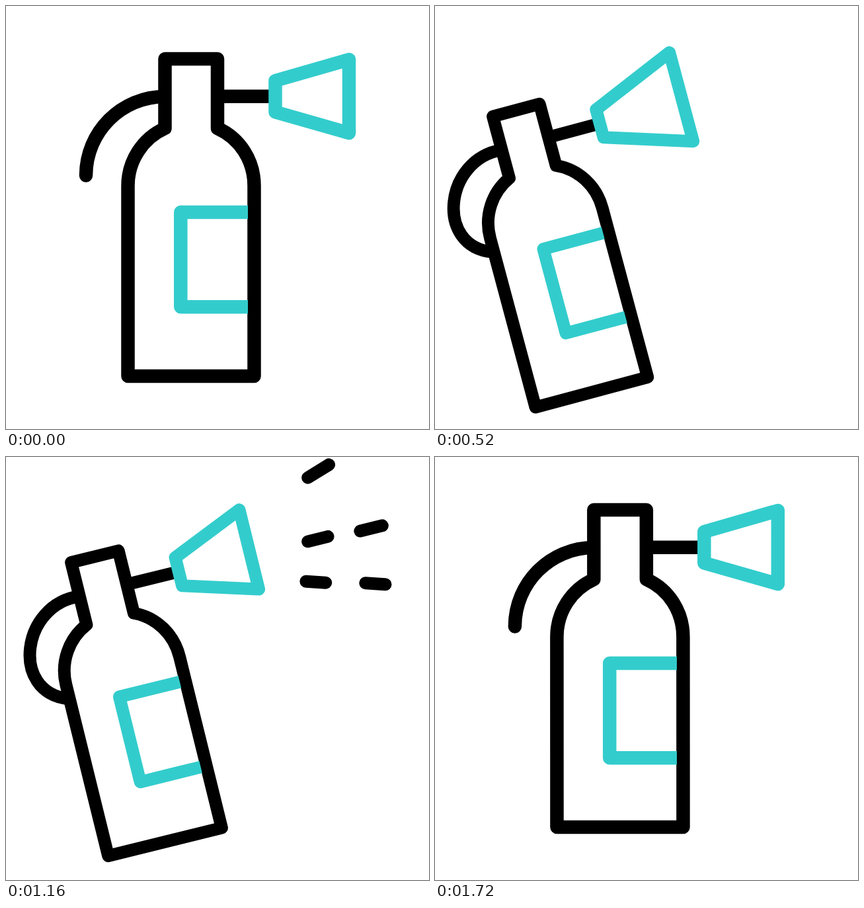
An HTML page that plays this animation: 640 px wide and 640 px high, repeating every 2 s.

```html
<!DOCTYPE html>
<html lang="en">
<head>
<meta charset="utf-8">
<title>Fire extinguisher</title>
<style>
  html, body { margin: 0; width: 100%; height: 100%; overflow: hidden; background: #fff; }
  svg { display: block; width: 100vw; height: 100vh; }
  path { fill: none; stroke: #000; stroke-width: 20.5; stroke-linecap: round; stroke-linejoin: round; }
  .teal { stroke: #33cccc; }
  .solid { fill: #fff; }
  #label { stroke-linecap: butt; }
</style>
</head>
<body>
<svg viewBox="0 0 640 640">
  <g id="rig">
    <path id="spray"/>
    <path id="handle"/>
    <path d="M320 136.7H407"/>
    <path id="horn" class="teal solid"/>
    <path class="solid" d="M240.5 185V80H320V185C354 200 375.5 234 375.5 272V560H184.5V272C184.5 234 207 200 240.5 185Z"/>
    <path id="label" class="teal" d="M366 312H264.3V455.3H366"/>
  </g>
</svg>
<script>
const LOOP = 2000, STEP = 40;
const $ = id => document.getElementById(id);

const ease = (t, from, to) => {
  const u = Math.min(1, Math.max(0, (t - from) / (to - from)));
  return u * u * (3 - 2 * u);
};
const mix = (a, b, k) => a + (b - a) * k;
const arc = (mid, end, k) => 2 * k * (1 - k) * mid + k * k * end;

// Three lanes fan out from the horn: height, path slope, acceleration, launch times
const LANES = [
  { y: 73.5, slope: -.35, acc: .0008, starts: [494, 736] },
  { y: 136, slope: .045, acc: .00055, starts: [523, 690] },
  { y: 186, slope: .277, acc: .00045, starts: [475, 677] }
];

// Later dashes leave a little faster and every dash grows on its way
function spray(t) {
  let d = '';
  LANES.forEach(({ y, slope, acc, starts }, lane) => starts.forEach((start, nth) => {
    if (t < start || t > 1700) return;
    const side = lane - 1;
    const x = 488 + acc * (1 + .12 * nth) * (t - start) ** 2;
    const w = 30.5 + (.04 - .036 * side) * (x - 544);
    d += `M${x} ${y + slope * (x - 548)}l${w} ${w * .32 * side}`;
  }));
  return d;
}

// Quarter circle when open, curled against the body when squeezed
function handle(k) {
  const at = (x0, y0, x1, y1) => `${mix(x0, x1, k)} ${mix(y0, y1, k)} `;
  return 'M240.5 137C' + at(174.5, 137, 145, 127) + at(121, 190.5, 93, 262) + at(121, 256.5, 182, 295);
}

// The mouth flares out, then settles to a smaller flare
function horn(open, settle) {
  const flare = 30 * open * (1 - .71 * settle);
  const x = 519 + flare, spread = .43 * flare;
  return `M407.5 113L${x} ${81 - 15 * open - spread}V${192.2 + spread}L407.5 160.3Z`;
}

function draw(t) {
  const go = ease(t, 120, 480), left = 1 - ease(t, 1043, 1733);
  const tilt = go * left;
  // Swing in on a wide arc, return on a nearly straight one
  const [x, y] = go < 1
    ? [arc(-99.3, -104.7, go), arc(-27.9, 41.5, go)]
    : [arc(-52.3, -104.7, left), arc(16, 41.5, left)];
  $('rig').setAttribute('transform',
    `translate(${320 + x} ${320 + y}) rotate(${-15 * tilt}) scale(${1 - .08 * tilt}) translate(-320 -320)`);

  const relax = 1 - ease(t, 1400, 1720);
  $('handle').setAttribute('d', handle(ease(t, 240, 480) * relax));
  $('horn').setAttribute('d', horn(ease(t, 240, 500) * relax, ease(t, 500, 680)));
  $('spray').setAttribute('d', spray(t));
}

function tick() {
  const t = performance.now() % LOOP;
  draw(Math.floor(t / STEP) * STEP);
  requestAnimationFrame(tick);
}
tick();
</script>
</body>
</html>
```
